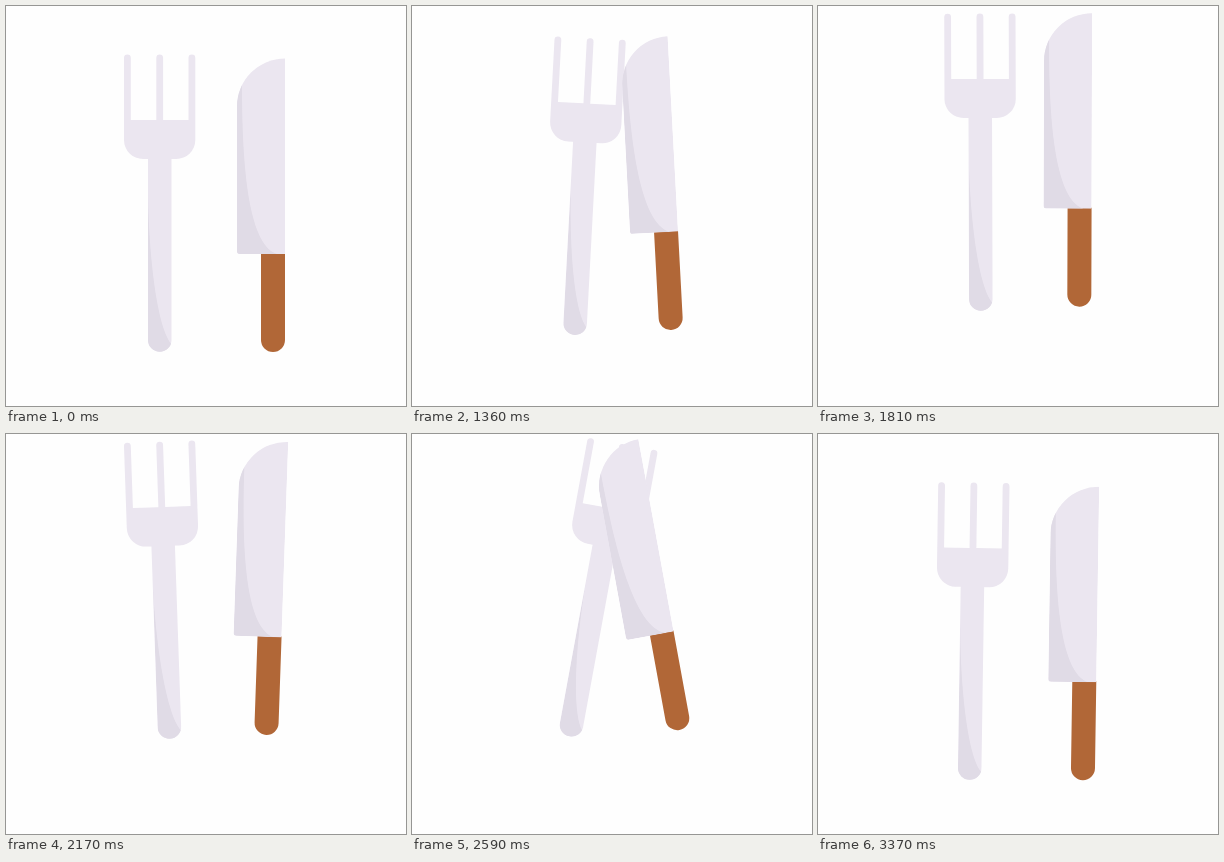
Write an HTML page that moves like this. It is 400x400 px and loops after 3430 ms.

```html
<!DOCTYPE html>
<html lang="en">
<head>
<meta charset="utf-8">
<title>Fork and knife</title>
<style>
  html, body { margin: 0; width: 100%; height: 100%; overflow: hidden; background: #fefefe; }
  svg { display: block; width: 100%; height: 100%; }
  .steel { fill: #ebe6f0; }
  .shade { fill: #e0dbe6; }
  .wood { fill: #b16737; }
</style>
</head>
<body>
<svg viewBox="0 0 400 400">
  <defs>
    <clipPath id="stem"><path d="M142 150H165.500V334A11.750 11.750 0 0 1 142 334Z"/></clipPath>
    <clipPath id="blade"><path d="M279 52.500V248H234A3 3 0 0 1 231 245V100.500A48 48 0 0 1 279 52.500Z"/></clipPath>
  </defs>
  <g id="fork">
    <path class="steel" d="M118 114V52a3.400 3.400 0 0 1 6.800 0V114H150.300V52a3.400 3.400 0 0 1 6.800 0V114H182.500V52a3.400 3.400 0 0 1 6.800 0V134a19 19 0 0 1 -19 19H165.500V334A11.750 11.750 0 0 1 142 334V153H137a19 19 0 0 1 -19 -19Z"/>
    <path class="shade" clip-path="url(#stem)" d="M142 180C142 240 150 320 165.500 338V350H142Z"/>
  </g>
  <g id="knife">
    <path class="wood" d="M255 247H279V334A12 12 0 0 1 255 334Z"/>
    <g clip-path="url(#blade)">
      <rect class="steel" x="230" y="50" width="50" height="200"/>
      <path class="shade" d="M236 78C236 150 240.500 238 271 248H230V78Z"/>
    </g>
  </g>
</svg>
<script>
const LOOP = 3430, START = 1030, STEP = 30;

// side: direction of "inwards"; arm: slide per degree of swing
const parts = [
  { id: "fork", side: 1, cx: 153.5, cy: 198, arm: 2.05, shift: 9, lift: 41, rise: 1220 },
  { id: "knife", side: -1, cx: 255, cy: 200, arm: 1.93, shift: 5.6, lift: 45.4, rise: 1195 }
];
for (const p of parts) p.el = document.getElementById(p.id);

// Ease in and out between [time, value] poses.
function ease(t, poses) {
  let [t0, v0] = poses[0];
  for (const [t1, v1] of poses) {
    if (t < t1) {
      const u = Math.max(0, (t - t0) / (t1 - t0));
      return v0 + (v1 - v0) * u * u * (3 - 2 * u);
    }
    [t0, v0] = [t1, v1];
  }
  return v0;
}

// Open, cross, open, cross, then settle.
const swingAt = t => ease(t, [[980, 0], [1130, -5.3], [1500, 7], [2025, -4.3], [2600, 10.4], [2950, -0.9], [3190, 0]]);
const leanAt = t => ease(t, [[2600, 0], [2950, 1.7], [3400, 0.85]]);
const heightAt = (t, rise) => ease(t, [[rise, 0], [1540, 1], [2600, 1], [2950, -0.08], [3190, 0]]);

function draw(ms) {
  const t = ms < START ? 0 : START + Math.floor((ms - START) / STEP) * STEP;
  const swing = swingAt(t), lean = leanAt(t);
  for (const p of parts) {
    const h = heightAt(t, p.rise);
    const arc = 28 * h * (1 - h);
    const x = p.side * (p.arm * swing + p.shift * h + arc);
    const turn = p.side * swing + lean;
    p.el.setAttribute("transform",
      `translate(${x.toFixed(3)} ${(-p.lift * h).toFixed(3)}) rotate(${turn.toFixed(3)} ${p.cx} ${p.cy})`);
  }
}

const begin = performance.now();
function tick() {
  draw((performance.now() - begin) % LOOP);
  requestAnimationFrame(tick);
}
tick();
</script>
</body>
</html>
```
